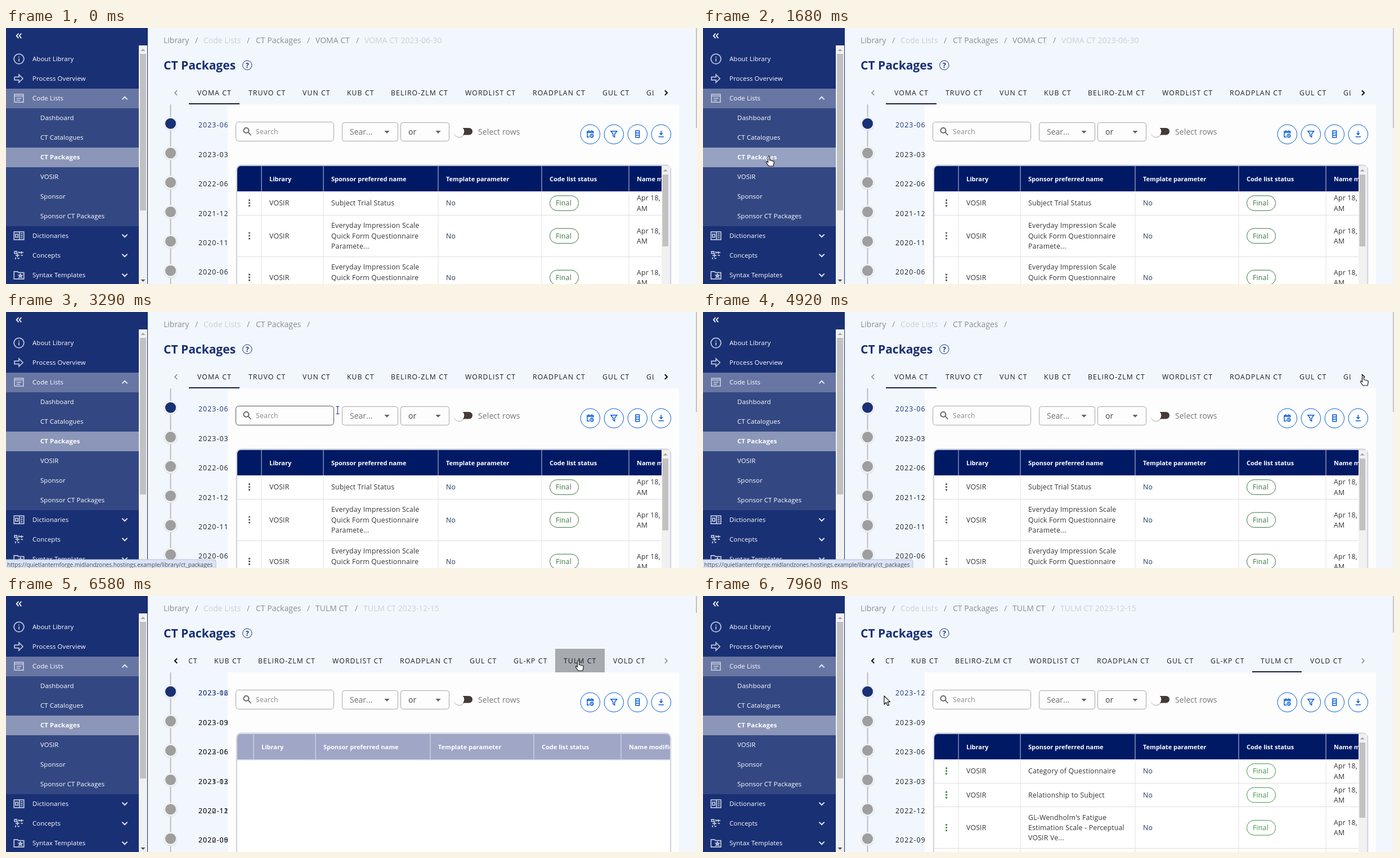
An HTML page with a canvas for the animation above (8000 ms loop, 1228x456 px).

```html
<!DOCTYPE html>
<html lang="en">
<head>
<meta charset="utf-8">
<title>CT Packages</title>
<style>
html, body { margin: 0; width: 100%; height: 100%; overflow: hidden; background: #f2f7fe; }
canvas { display: block; width: 1228px; height: 456px; }
</style>
</head>
<body>
<canvas id="stage"></canvas>
<script>
const W = 1228, H = 456, LOOP = 8000;
const canvas = document.getElementById('stage');
const g = canvas.getContext('2d');
const dpr = window.devicePixelRatio || 1;
canvas.width = W * dpr;
canvas.height = H * dpr;

const FONT = '"Open Sans", "Noto Sans", sans-serif';
const NAVY = '#193074', HEAD = '#001965', BLUE = '#005ad2', BG = '#f2f7fe', CARD = '#fdfdfd';

// Event times in ms
const PRESS = 1960, CRUMB = 2100, SCROLL = 5230, NAV = 6570, LOADED = 7270;

const icons = {
  info: 'M12 2a10 10 0 1 0 .01 0M12 11v6M12 7v2',
  arrow: 'M3 9h9V4l8 8-8 8v-5H3z',
  list: 'M3 4h18v16H3zM3 7.5h18M7 12h10M7 16h7',
  dict: 'M2 4h20v16H2zM13 4v16M5 9h5v6H5zM15.5 8h4M15.5 12h4M15.5 16h4',
  concepts: 'M3 4h5v4H3zM12 4v4M12 6h9M17 4v5M5 12h8M9 8v8M16 12h4M5 16v4M9 18h4',
  folder: 'M2 5h7l2 2h11v13H2zM15 10l1 2.5h2.5l-2 2 1 2.5-2.5-1.5-2.5 1.5 1-2.5-2-2H14z',
  back: 'M11 6l-5 6 5 6M18 6l-5 6 5 6',
  left: 'M14.7 6.7L9.4 12l5.3 5.3',
  right: 'M9.3 6.7l5.3 5.3-5.3 5.3',
  up: 'M6.7 14.7L12 9.4l5.3 5.3',
  down: 'M6.7 9.3l5.3 5.3 5.3-5.3',
  search: 'M9.5 4a5.5 5.5 0 1 0 .01 0M13.7 13.7l6 6',
  calendar: 'M20 10V5H4v15h6M4 8h16M8 2v3M16 2v3M16 12a4.5 4.5 0 1 0 .01 0M16 14v3l2 1',
  filter: 'M4 4h16l-6 8v8l-4-3v-5z',
  columns: 'M7 3h10v18H7zM7 9h10M7 15h10',
  download: 'M12 3v10M8 9.5l4 4 4-4M5 19h14'
};
const pointers = {
  arrow: new Path2D('M0 0v15l3.5-3.3 2.6 5.5 2.4-1.1-2.6-5.4h4.6z'),
  hand: new Path2D('M-1.5 1.5c0-2 3-2 3 0v6l6 1.5c1.5.5 2 1.5 1.7 3l-1.2 6h-8l-4.5-6c-1-1.5 1-2.7 2-1.5l1 1z')
};

const tabs = [
  ['VOMA CT', 340], ['TRUVO CT', 431], ['VUN CT', 527], ['KUB CT', 606],
  ['BELIRO-ZLM CT', 684], ['WORDLIST CT', 816], ['ROADPLAN CT', 936],
  ['GUL CT', 1060], ['GL-KP CT', 1138], ['TULM CT', 1227], ['VOLD CT', 1315]
];
const menu = [
  ['About Library', 'info'], ['Process Overview', 'arrow'], ['Code Lists', 'list', 'up'],
  ['Dashboard'], ['CT Catalogues'], ['CT Packages'], ['VOSIR'], ['Sponsor'], ['Sponsor CT Packages'],
  ['Dictionaries', 'dict', 'down'], ['Concepts', 'concepts', 'down'], ['Syntax Templates', 'folder', 'down']
];
const columns = [['Library', 468], ['Sponsor preferred name', 578], ['Template parameter', 782],
  ['Code list status', 966], ['Name modified', 1121]];
const scaleName = ['Everyday Impression Scale', 'Quick Form Questionnaire', 'Paramete...'];
const before = {
  crumb: 'VOMA CT', day: '2023-06-30', page: 178, thumb: 389, dots: '#616161', pill: '#3a733d',
  dates: ['2023-06-30', '2023-03-31', '2022-06-24', '2021-12-17', '2020-11-06', '2020-06-26'],
  rows: [['Subject Trial Status'], scaleName, scaleName]
};
const after = {
  crumb: 'TULM CT', day: '2023-12-15', page: 65, thumb: 395, dots: '#3f9142', pill: '#3f9142',
  dates: ['2023-12-15', '2023-09-29', '2023-06-30', '2023-03-31', '2022-12-16', '2022-09-30'],
  rows: [['Category of Questionnaire'], ['Relationship to Subject'],
    ["GL-Wendholm's Fatigue", 'Estimation Scale - Perceptual', 'VOSIR Ve...'], ['']]
};
const path = [
  [920, 985, 438], [1000, 770, 415], [1060, 655, 407], [1130, 553, 402], [1200, 405, 355],
  [1400, 215, 272], [1680, 117, 228], [2890, 117, 228], [3080, 330, 200], [3290, 588, 175],
  [3430, 720, 154], [3560, 800, 147], [3680, 870, 146], [4500, 1138, 138], [4780, 1173, 113],
  [5750, 1173, 113], [6300, 1035, 116], [6510, 1017, 115], [7200, 1017, 115],
  [7420, 880, 139], [7720, 527, 164], [7960, 322, 178]
];

const clamp = v => Math.max(0, Math.min(1, v));
const phase = (t, a, b) => clamp((t - a) / (b - a));
const smooth = p => p * p * (3 - 2 * p);

function text(s, x, y, size, color, weight = 400, space = 0) {
  g.font = `${weight} ${size}px ${FONT}`;
  g.letterSpacing = space + 'px';
  g.fillStyle = color;
  g.fillText(s, x, y + size * 0.36);
}
const cell = (s, x, y, color = '#333') => text(s, x, y, 12.25, color, 400, 0.22);
const tabText = (s, x, y, color) => text(s, x, y, 12.25, color, 500, 1.09);

function rect(x, y, w, h, color) {
  g.fillStyle = color;
  g.fillRect(x, y, w, h);
}
function box(x, y, w, h, r, fill, stroke, line = 1) {
  g.beginPath();
  g.roundRect(x, y, w, h, r);
  if (fill) { g.fillStyle = fill; g.fill(); }
  if (stroke) { g.strokeStyle = stroke; g.lineWidth = line; g.stroke(); }
}
function disc(x, y, r, fill, stroke) {
  box(x - r, y - r, 2 * r, 2 * r, r, fill, stroke);
}
function tri(x, y, w, h, color) {
  g.fillStyle = color;
  g.beginPath();
  g.moveTo(x - w, y - h); g.lineTo(x + w, y - h); g.lineTo(x, y + h);
  g.fill();
}
function icon(name, x, y, size, color, line = 2) {
  g.save();
  g.translate(x - size / 2, y - size / 2);
  g.scale(size / 24, size / 24);
  g.strokeStyle = color;
  g.lineWidth = line;
  g.stroke(new Path2D(icons[name]));
  g.restore();
}
function clipped(x, y, w, h, draw) {
  g.save();
  g.beginPath();
  g.rect(x, y, w, h);
  g.clip();
  draw();
  g.restore();
}

function sidebar(t) {
  rect(0, 0, 252, H, NAVY);
  icon('back', 23, 14, 17, '#fff', 2.6);
  rect(0, 108, 236, 35, '#6876a3');
  rect(0, 143, 236, 210, '#334883');
  rect(0, 213, 236, 35, t > 1640 && t < 2960 ? '#97a1c1' : '#8b96b9');
  menu.forEach(([label, mark, fold], i) => {
    const y = 55 + i * 35;
    if (mark) icon(mark, 23, y, 21, '#c0c8dd');
    if (fold) icon(fold, 211, y, 21, '#e4e8f2', 2.2);
    text(label, mark ? 47 : 61, y, 11.4, '#fff', i === 5 ? 700 : 400, 0.1);
  });
  const spread = phase(t, PRESS, PRESS + 300);
  if (spread > 0 && t < 2480) clipped(0, 213, 236, 35, () => {
    g.globalAlpha = 0.48 * (1 - phase(t, 2200, 2480));
    disc(117.5, 230, 35 + 84 * (1 - (1 - spread) ** 2), '#fff');
  });
  rect(236, 31, 15, H - 31, '#f1f1f1');
  rect(238, 46, 11, 279, '#c1c1c1');
  tri(243.5, 39, 4, -2, '#a3a3a3');
  tri(243.5, 450, 4, 2, '#505050');
}

function breadcrumbs(t) {
  const data = t < NAV ? before : after;
  const link = (s, x, color = '#8b8f95') => text(s, x, 22, 14, color);
  const pale = '#ccd0d6';
  link('Library', 280);
  link('/', 336);
  link('Code Lists', 351, pale);
  link('/', 428);
  link('CT Packages', 444);
  link('/', 535);
  if (t > CRUMB && t < NAV) return;
  const shift = t < NAV ? 0 : -2;
  link(data.crumb, 550);
  link('/', 622 + shift);
  link(data.crumb + ' ' + data.day, 637 + shift, pale);
}

function tabBar(t) {
  const p = phase(t, SCROLL, SCROLL + 300);
  const shift = -236 * smooth(p);
  const moved = t > SCROLL;
  clipped(325, 90, 826, 47, () => {
    const hover = phase(t, 6260, 6400) * (1 - phase(t, 7260, 7400));
    if (hover > 0) {
      const pressed = phase(t, 6440, 6560) * (1 - phase(t, 6650, 6950));
      g.globalAlpha = hover * (0.14 + 0.17 * pressed);
      rect(976, 94, 88, 42, '#000');
      g.globalAlpha = 1;
    }
    tabs.forEach(([s, x]) => tabText(s, x + shift, 116, '#1c1d22'));
    const slide = smooth(phase(t, NAV + 30, NAV + 300));
    rect(325 + shift + 887 * slide, 134, 90 - 2 * slide, 2, '#15203f');
  });
  icon('left', 302, 115.5, 19, moved ? '#111' : '#85888d', moved ? 2.6 : 2);
  icon('right', 1173, 115.5, 19, moved ? '#85888d' : '#111', moved ? 2 : 2.6);
}

function timeline(t) {
  rect(291.5, 136, 2, H - 136, '#b9bcc2');
  for (let i = 0; i < 6; i++) {
    const y = 170.3 + i * 52.4;
    disc(292.5, y + 0.5, 12.5, '#dcdfe4');
    disc(292.5, y, 12, '#f1f2f4');
    disc(292.5, y, 9.5, i ? '#9e9e9e' : NAVY);
  }
  const list = dates => dates.forEach((s, i) => tabText(s, 342, 173 + i * 52.4, i ? '#1c1d22' : NAVY));
  clipped(325, 136, 69, H, () => {
    if (t >= NAV) list(after.dates);
    g.globalAlpha = 1 - phase(t, NAV + 50, NAV + 330);
    if (g.globalAlpha > 0) list(before.dates);
  });
}

function toolbar(t) {
  const hot = t > 3200 && t < 3330;
  box(408.5, 167.5, 174, 34, 5, CARD, hot ? '#555' : '#a6a6a6');
  icon('search', 429, 184.5, 20, '#6b6b6b', 2.4);
  text('Search', 444, 185, 12.25, '#8a8a8a', 400, 0.2);
  box(597.5, 168.5, 99, 33, 4, CARD, '#a6a6a6');
  text('Sear...', 611, 185, 14, '#707070');
  tri(677, 185.5, 4.6, 2.4, '#666');
  box(701.5, 168.5, 86, 33, 4, CARD, '#a6a6a6');
  text('or', 715, 185, 14, '#444');
  tri(768, 185.5, 4.6, 2.4, '#666');
  box(798, 178, 31, 12.5, 6.2, '#453a36');
  disc(805.5, 185.8, 10, 'rgba(0,0,0,.18)');
  disc(805, 184.3, 9.4, '#fff');
  text('Select rows', 839, 184.5, 14, '#777', 400, 0.1);
  ['calendar', 'filter', 'columns', 'download'].forEach((name, i) => {
    disc(1038.3 + i * 42, 189.3, 17.2, '#fff', BLUE);
    icon(name, 1038.3 + i * 42, 189, 16, BLUE, 2.2);
  });
}

function tableRows(data) {
  let y = 291;
  for (const lines of data.rows) {
    const h = lines.length > 1 ? 74.2 : 42.5, mid = y + h / 2 - 0.5;
    for (const d of [-5, 0, 5]) disc(432.5, mid + d, 1.7, data.dots);
    cell('VOSIR', 468, mid);
    lines.forEach((s, i) => cell(s, 578, mid + (i - (lines.length - 1) / 2) * 18.4));
    cell('No', 782, mid, '#23345c');
    box(966.5, mid - 13, 51, 26.5, 13, null, data.pill);
    cell('Final', 977, mid, data.pill);
    cell('Apr 18,', 1121, mid - 9);
    cell('AM', 1121, mid + 9.4);
    y += h;
    rect(411, Math.round(y) - 1, 754, 1, '#dedede');
  }
  for (const [, x] of columns) rect(x - 14.5, 291, 1, H - 291, '#e2e2e2');
}

function table(t) {
  const loading = t >= NAV && t < LOADED;
  const data = t < NAV ? before : after;
  const right = loading ? 1180 : 1165, shift = loading ? -14 : 0;
  box(410, 244.5, 771, 260, 8, '#fff', '#d3d6e2', 2.5);
  clipped(411, 245.5, right - 411, H, () => {
    box(411, 245.5, 769, 300, 7, '#fff');
    clipped(411, 245, 769, 46, () => box(411, 245.5, 769, 80, 7, loading ? '#9fa6c6' : HEAD));
    for (const [s, x] of columns) {
      rect(x + shift - 14.5, 246, 1, 45, loading ? '#e2e4ee' : '#c6cce0');
      text(s, x + shift, 269.5, 11, '#fff', 700);
    }
    if (loading) rect(411, 291, 769, 1.5, '#d5d8e4');
    else tableRows(data);
  });
  if (loading) return;
  rect(1165, 246, 15, H - 246, '#f1f1f1');
  rect(1166.5, 261, 10.5, data.thumb - 261, '#c1c1c1');
  tri(1171.8, 253.5, 4, -2, '#a3a3a3');
}

function tooltip(t) {
  const a = phase(t, 1040, 1150) * (1 - phase(t, 1220, 1380));
  if (!a) return;
  g.globalAlpha = a;
  box(441.5, 380, 430, 28, 4, 'rgba(112,112,112,.77)');
  cell(scaleName[0] + ' ' + scaleName[1] + ' Parameter Name', 455, 394, '#fff');
  g.globalAlpha = 1;
}

function statusBar(t) {
  g.globalAlpha = phase(t, 1750, 1820) * (1 - phase(t, 5380, 5480));
  if (g.globalAlpha > 0) {
    box(-1, 441, 374, 17, [0, 4, 0, 0], '#dbe4f6', '#b4bfd6');
    text('https://quietlanternforge.midlandzones.hostings.example/library/ct_packages', 2, 450, 10.1, '#474b55');
  }
  g.globalAlpha = 1;
}

function pointerAt(t) {
  const i = path.findIndex(k => k[0] > t);
  if (i < 0) return path[path.length - 1].slice(1);
  const [a, x, y] = path[i - 1], [b, x2, y2] = path[i], p = phase(t, a, b);
  return [x + (x2 - x) * p, y + (y2 - y) * p];
}
function pointer(t) {
  if (t < path[0][0]) return;
  const [x, y] = pointerAt(t);
  if (t > 3200 && t < 3330) {
    rect(x, y - 7, 1, 14, NAVY);
    rect(x - 2.5, y - 7, 6, 1, NAVY);
    rect(x - 2.5, y + 6, 6, 1, NAVY);
    return;
  }
  const shape = pointers[x < 236 || y < 136 ? 'hand' : 'arrow'];
  g.save();
  g.translate(x, y);
  g.lineJoin = 'round';
  g.lineWidth = 1.2;
  g.fillStyle = '#fff';
  g.strokeStyle = '#111';
  g.fill(shape);
  g.stroke(shape);
  g.restore();
}

function draw(t) {
  g.setTransform(dpr, 0, 0, dpr, 0, 0);
  rect(0, 0, W, H, BG);
  rect(394, 136, 802, H, CARD);
  sidebar(t);
  breadcrumbs(t);
  text('CT Packages', 280, 66.5, 21, NAVY, 700);
  disc(428.8, 66.3, 8.2, null, NAVY);
  text('?', 426, 66.3, 12, NAVY, 700);
  tabBar(t);
  timeline(t);
  toolbar(t);
  table(t);
  const page = t < NAV ? before.page : t < NAV + 330 ? 30 : after.page;
  rect(1225, 0, 3, H, '#f3f5f8');
  rect(1226, 0, 2, page, '#c1c4c9');
  tooltip(t);
  statusBar(t);
  pointer(t);
}

const start = performance.now();
function frame() {
  draw((performance.now() - start) % LOOP);
  requestAnimationFrame(frame);
}
frame();
</script>
</body>
</html>
```
